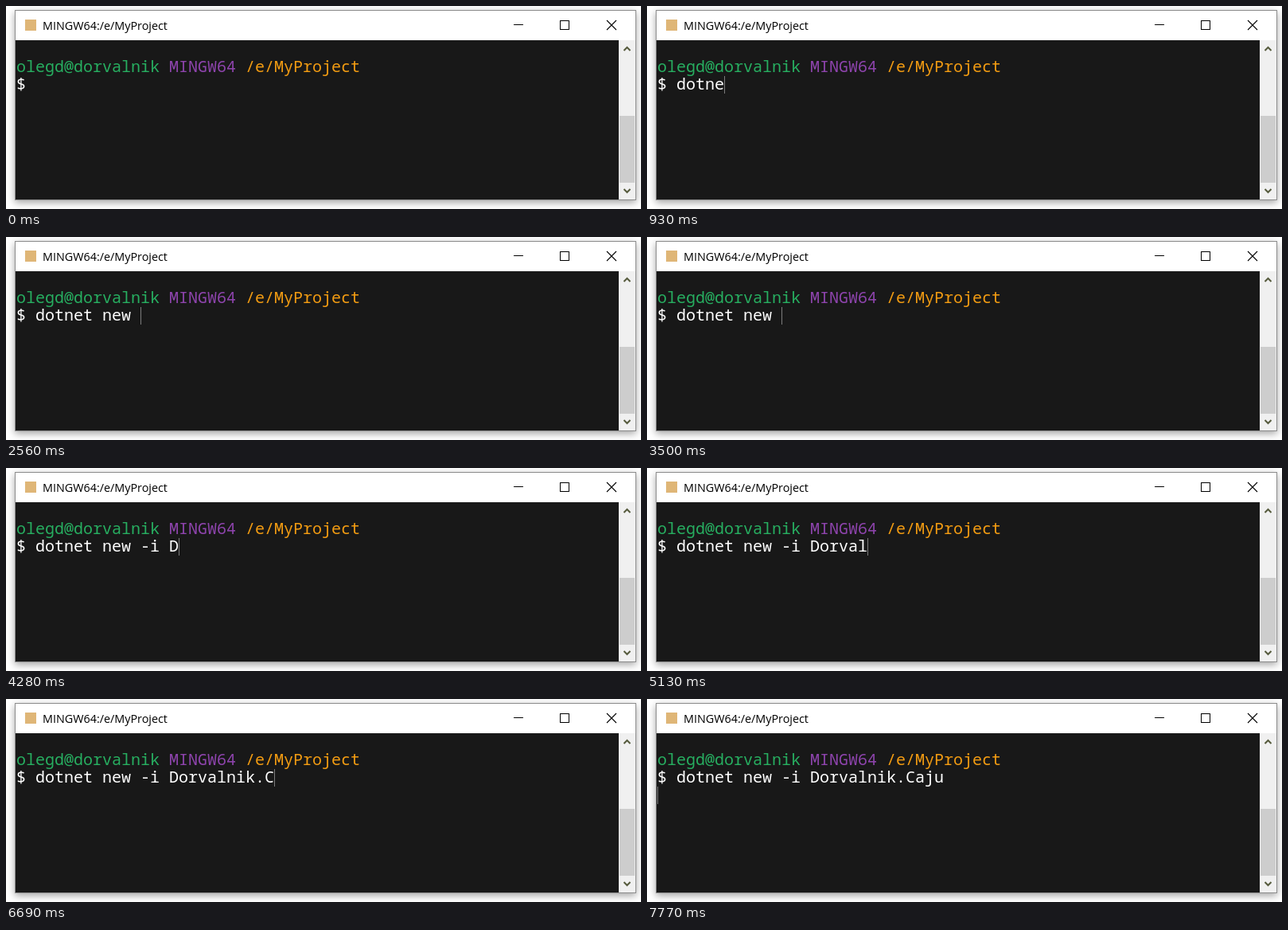
Animation of 798x255 px, one loop 8000 ms. Source, as an HTML page:

```html
<!DOCTYPE html>
<html lang="en">
<head>
<meta charset="utf-8">
<title>Terminal</title>
<style>
  html, body { margin: 0; width: 100%; height: 100%; overflow: hidden; background: #fff; }
  .window {
    position: absolute; left: 12px; top: 6px; width: 779px; height: 237px;
    background: #fff;
    box-shadow: 0 0 0 1px #8c8c8c, 0 3px 9px 1px rgba(0, 0, 0, .36);
  }
  svg { position: absolute; left: 0; top: 0; display: block; }
  text { white-space: pre; }
  .title { font: 14.35px "Open Sans", "Noto Sans", sans-serif; fill: #000; }
  .term { font: 20px "Noto Sans Mono", "DejaVu Sans Mono", monospace; fill: #fff; }
  .user { fill: #27ae60; }
  .system { fill: #8e44ad; }
  .path { fill: #f39c12; }
  .line { fill: none; stroke: #000; }
  .arrow { fill: none; stroke: #555a3c; stroke-width: 2; }
</style>
</head>
<body>
<div class="window"></div>
<svg width="798" height="255" viewBox="0 0 798 255">
  <rect x="24" y="17" width="14" height="14" fill="#dfb677"/>
  <text class="title" x="46" y="30">MINGW64:/e/MyProject</text>
  <path class="line" shape-rendering="crispEdges" d="M638 23.5h12M696.5 18.5h11v11h-11z"/>
  <path class="line" stroke-width="1.1" d="M755 18l12 12M767 18l-12 12"/>

  <rect x="12" y="43" width="758" height="200" fill="#181818"/>
  <rect x="770" y="43" width="21" height="200" fill="#f0f0f0"/>
  <rect x="771" y="138" width="19" height="84" fill="#cdcdcd"/>
  <path class="arrow" d="M776.5 56l4-4 4 4M776.5 230l4 4 4-4"/>

  <text class="term" x="13" y="83"><tspan class="user">olegd@dorvalnik</tspan> <tspan class="system">MINGW64</tspan> <tspan class="path">/e/MyProject</tspan></text>
  <text class="term" x="13" y="105" id="command">$ </text>
  <rect id="caret" x="37" y="88" width="1" height="22" fill="#7c7c7c" visibility="hidden"/>
</svg>
<script>
  const LOOP = 8000, LEFT = 13, CELL = 12, ROW = 22, TOP = 88;
  const LINE = "$ dotnet new -i Dorvalnik.Caju";
  const command = document.getElementById("command");
  const caret = document.getElementById("caret");

  // Each key press reveals the next character of the command.
  const keys = [
    80, 310, 460, 780, 930, 1630, 1780,
    2100, 2250, 2400, 2560, 3560, 3720, 3880,
    4280, 4430, 4600, 4780, 4960, 5130, 5300, 5370, 5600,
    6060, 6690, 6760, 6960, 7160
  ];
  const ENTER = 7770;
  // Spans in which the caret is blinked off.
  const hidden = [[0, 80], [1480, 1630], [3030, 3430], [7620, ENTER]];

  function draw(t) {
    const count = 2 + keys.filter(k => k <= t).length;
    const entered = t >= ENTER;
    const off = hidden.some(([from, to]) => t >= from && t < to);
    command.textContent = LINE.slice(0, count);
    caret.setAttribute("x", LEFT + (entered ? 0 : count * CELL));
    caret.setAttribute("y", TOP + (entered ? ROW : 0));
    caret.setAttribute("visibility", off ? "hidden" : "visible");
  }

  const start = performance.now();
  function tick() {
    draw((performance.now() - start) % LOOP);
    requestAnimationFrame(tick);
  }
  tick();
</script>
</body>
</html>
```
